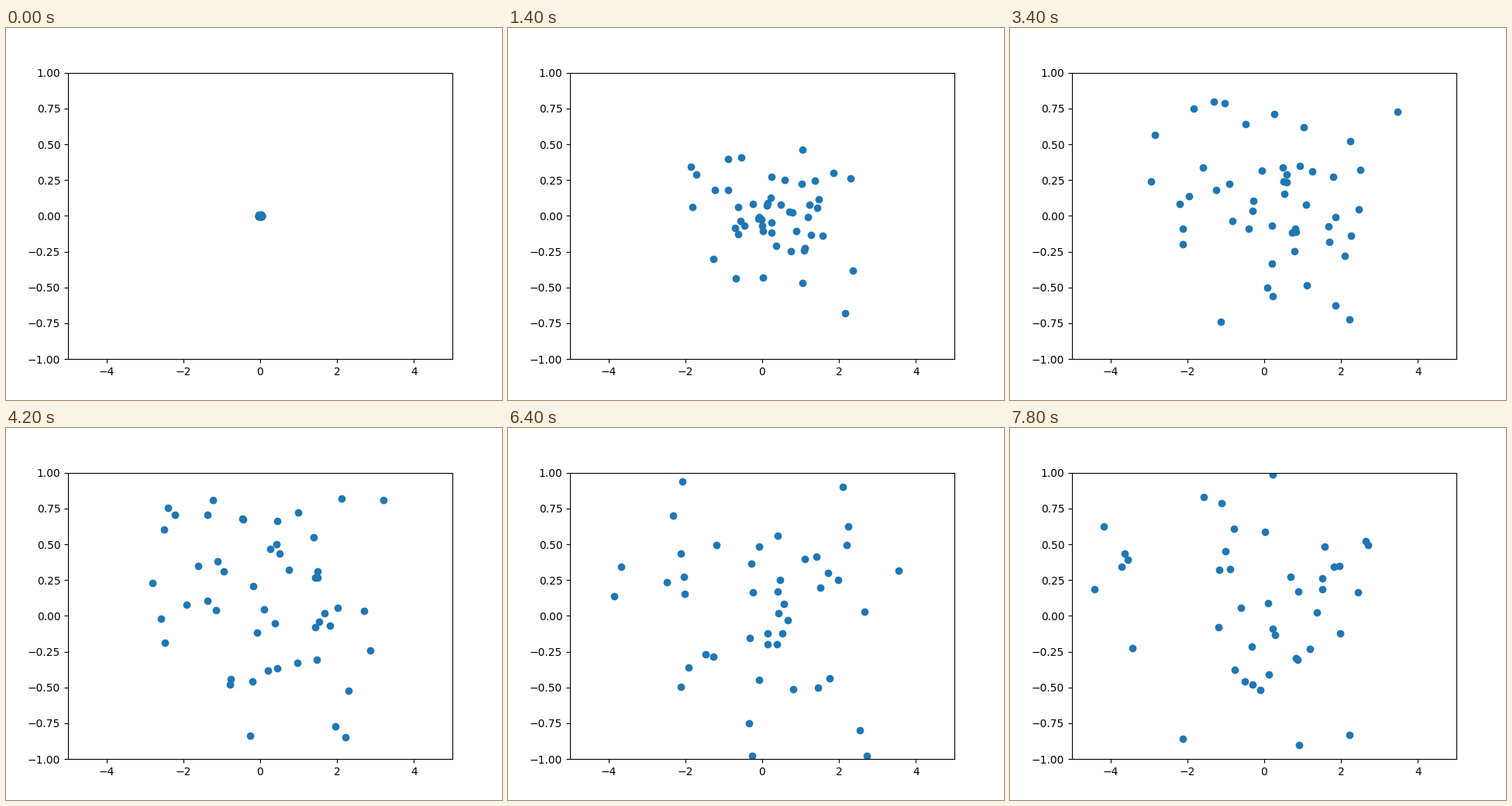
These frames come from a looping animation (640 px wide and 480 px high, 8000 ms). A matplotlib script:

```python
import numpy as np
import matplotlib.pyplot as plt
from matplotlib.animation import FuncAnimation

FRAMES, INTERVAL = 40, 200
DOTS = 50
START = (0.04, 0.006)  # half width of the first cluster in x and y
STEP = (0.38, 0.1)     # spread of one step in x and y


def random_walk(seed=3):
    """Dots leave a tight cluster in the middle, one normal step per frame."""
    rng = np.random.default_rng(seed)
    start = rng.uniform(-1, 1, (1, DOTS, 2)) * START
    steps = rng.normal(0, STEP, (FRAMES - 1, DOTS, 2))
    return np.concatenate([start, steps]).cumsum(axis=0)


walk = random_walk()

fig, ax = plt.subplots(figsize=(6.4, 4.8), dpi=100)
ax.set_xlim(-5, 5)
ax.set_ylim(-1, 1)
dots, = ax.plot([], [], 'o', color='C0')


def update(i):
    dots.set_data(*walk[i].T)
    return dots,


anim = FuncAnimation(fig, update, frames=FRAMES, interval=INTERVAL,
                     repeat=True, repeat_delay=0)
plt.show()
```
